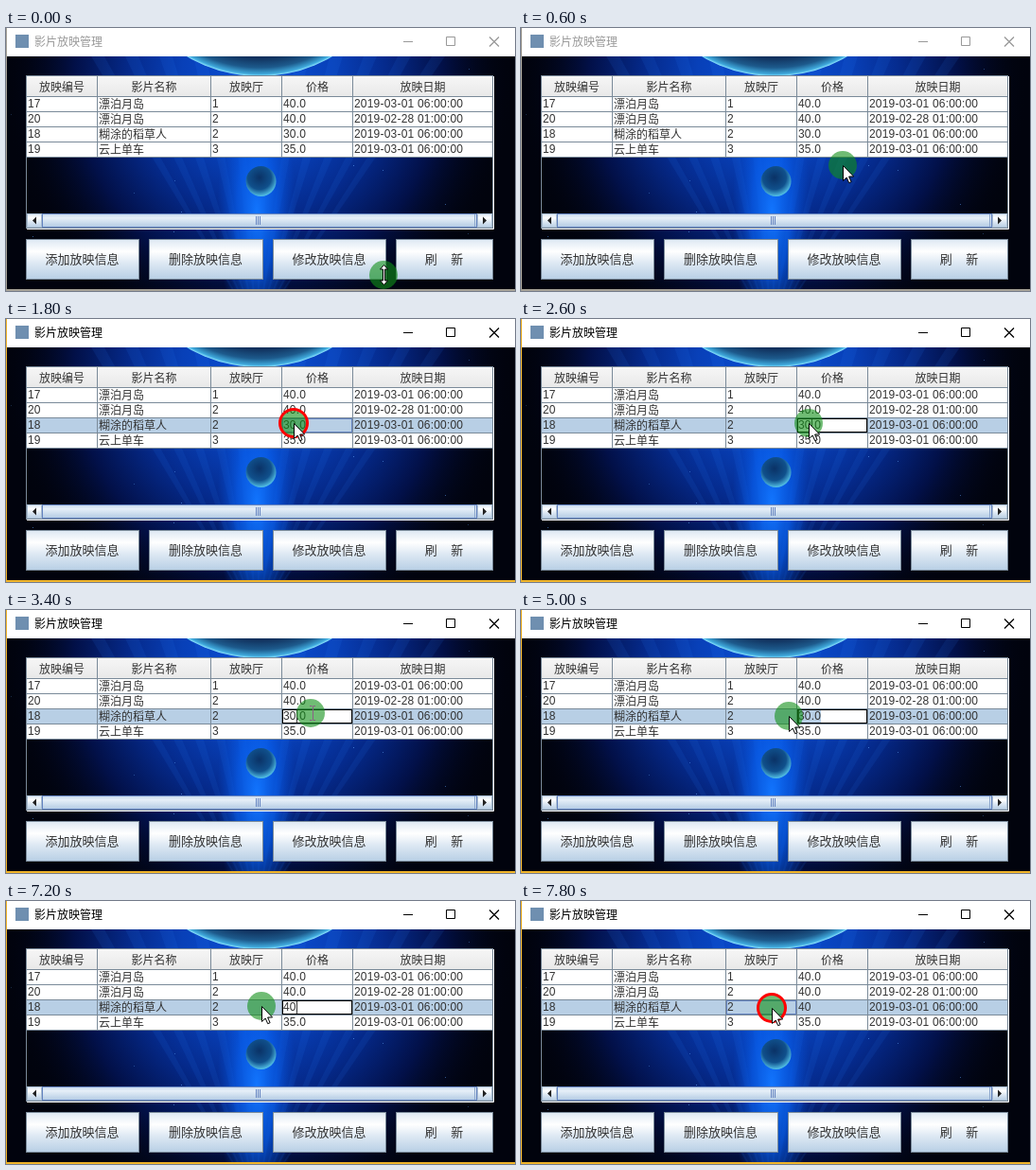
An HTML page that plays this animation: 538x278 px, repeating every 8000 ms.

```html
<!DOCTYPE html>
<html lang="zh-CN">
<head>
<meta charset="utf-8">
<style>
html, body { margin: 0; width: 538px; height: 278px; overflow: hidden; }
svg { display: block; }
text { font: 12px "Liberation Sans", "Noto Sans CJK SC", "Noto Sans CJK", sans-serif; fill: #333; white-space: pre; }
.num { letter-spacing: .2px; }
.btn { font-size: 13px; }
.mid { text-anchor: middle; }
</style>
</head>
<body>
<svg id="stage" width="538" height="278">
  <defs>
    <linearGradient id="metal" x2="0" y2="1">
      <stop stop-color="#dde8f3"/><stop offset=".3" stop-color="#fff"/>
      <stop offset=".6" stop-color="#dde8f3"/><stop offset="1" stop-color="#b8cfe5"/>
    </linearGradient>
    <linearGradient id="thumb" x2="0" y2="1">
      <stop stop-color="#c6d9ec"/><stop offset=".3" stop-color="#e6eff8"/><stop offset="1" stop-color="#b3cbe3"/>
    </linearGradient>
    <linearGradient id="head" x2="0" y2="1">
      <stop stop-color="#f6f6f6"/><stop offset="1" stop-color="#e8e8e8"/>
    </linearGradient>
    <radialGradient id="glow">
      <stop stop-color="#0a50d8"/><stop offset=".3" stop-color="#0840b8"/>
      <stop offset=".5" stop-color="#052a8c"/><stop offset=".72" stop-color="#021048"/>
      <stop offset="1" stop-color="#01030d" stop-opacity="0"/>
    </radialGradient>
    <radialGradient id="beam">
      <stop stop-color="#1276ff"/><stop offset=".5" stop-color="#0860f0" stop-opacity=".7"/>
      <stop offset="1" stop-color="#0550d8" stop-opacity="0"/>
    </radialGradient>
    <radialGradient id="world">
      <stop offset=".87" stop-color="#10305c"/><stop offset=".94" stop-color="#1d5a8c"/>
      <stop offset=".985" stop-color="#3fa9dc"/><stop offset="1" stop-color="#8fe6ff"/>
    </radialGradient>
    <radialGradient id="moon" cx=".45" cy=".38" r=".65">
      <stop stop-color="#0a3266"/><stop offset=".6" stop-color="#10508c"/><stop offset="1" stop-color="#5cd0f2"/>
    </radialGradient>
  </defs>
  <g id="scene"></g>
  <g id="live"></g>
</svg>
<script>
const $ = id => document.getElementById(id);
const rect = (x, y, w, h, fill, more = "") =>
  `<rect x="${x}" y="${y}" width="${w}" height="${h}" fill="${fill}" ${more}/>`;
const frame = (x, y, w, h, color, fill = "none") =>
  rect(x + .5, y + .5, w - 1, h - 1, fill, `stroke="${color}"`);
const text = (x, y, s, cls = "", more = "") =>
  `<text x="${x}" y="${y}" class="${cls}" ${more}>${s}</text>`;
const line = (d, color, more = "") => `<path d="${d}" fill="none" stroke="${color}" ${more}/>`;

const GRID = "#7a8a99", SELECTED = "#b8cfe5";
const cols = [22, 97, 217, 292, 367, 515];
const heads = ["放映编号", "影片名称", "放映厅", "价格", "放映日期"];
const rows = [
  ["17", "漂泊月岛", "1", "40.0", "2019-03-01 06:00:00"],
  ["20", "漂泊月岛", "2", "40.0", "2019-02-28 01:00:00"],
  ["18", "糊涂的稻草人", "2", "30.0", "2019-03-01 06:00:00"],
  ["19", "云上单车", "3", "35.0", "2019-03-01 06:00:00"]
];
const buttons = [[21, 120, "添加放映信息"], [151, 121, "删除放映信息"], [282, 120, "修改放映信息"], [412, 103, "刷    新"]];

function sky() {
  let seed = 7, stars = "", rays = "";
  const rnd = () => (seed = seed * 16807 % 2147483647) / 2147483647;
  for (let i = 0; i < 45; i++)
    stars += rect(rnd() * 538 | 0, 30 + rnd() * 247 | 0, 1, 1, "#5b9cf0", `opacity="${.2 + rnd() * .5}"`);
  for (let x = 90; x < 460; x += 36)
    rays += `<path d="M265 320L${x} 30h14z" fill="#2a80ff" opacity=".1"/>`;
  return rect(0, 30, 538, 248, "#01030d") +
    `<ellipse cx="267" cy="50" rx="270" ry="300" fill="url(#glow)"/>${rays}
    <ellipse cx="265" cy="195" rx="42" ry="135" fill="url(#beam)"/>` + stars +
    `<circle cx="268" cy="-101" r="152" fill="url(#world)"/>
    <circle cx="269.500" cy="162" r="16" fill="url(#moon)"/>`;
}

function rowArt(r, price, selected) {
  const y = 73 + r * 16;
  return rect(22, y, 492, 15, selected ? SELECTED : "#fff") +
    line(`M22 ${y + 15.5}H514` + cols.slice(1).map(x => `M${x - .5} ${y}v16`).join(""), GRID) +
    rows[r].map((s, i) => i == 1 ? text(cols[i] + 1, y + 12, s)
      : text(cols[i] + 1, y + 11, i == 3 ? price : s, "num")).join("");
}

function table() {
  return rect(22, 51, 492, 22, "url(#head)") +
    line("M22 72.5H514" + cols.slice(1).map(x => `M${x - .5} 51v22`).join(""), GRID) +
    heads.map((s, i) => text((cols[i] + cols[i + 1] - 1) / 2, 66.5, s, "mid")).join("") +
    rows.map((r, i) => rowArt(i, r[3])).join("") +
    rect(22, 196, 492, 15, "#eee") +
    frame(22, 196, 16, 15, "#a9bdd2", "url(#metal)") + frame(498, 196, 16, 15, "#a9bdd2", "url(#metal)") +
    frame(38, 196, 460, 15, "#6382bf", "url(#thumb)") + line("M495.5 197v13", "#8fa9cc") +
    line("M264.5 199v9m2-9v9m2-9v9", "#6382bf") +
    `<path d="M32 199.500v8l-4-4zM504 199.500v8l4-4z" fill="#222"/>` +
    frame(21, 50, 494, 162, GRID) + line("M515.5 51V212.5H22", "#fff");
}

$("scene").innerHTML = sky() + table() + buttons.map(([x, w, s]) =>
  frame(x, 223, w, 43, GRID, "url(#metal)") + text(x + w / 2 - .5, 249, s, "btn mid")).join("");

// Pointer stops: time, x, y
const path = [
  [0, 399, 261], [200, 394, 240], [600, 340, 145], [800, 305, 114], [1000, 308, 111], [1200, 317, 110],
  [1600, 304, 110], [2600, 304, 110], [2800, 298, 111], [3000, 299, 106], [3400, 322, 109],
  [3600, 322, 109], [4200, 283, 112], [6600, 283, 112], [7000, 275, 109], [7400, 265, 113], [8000, 265, 113]
];
const within = (t, ...spans) => spans.some(([a, b]) => t >= a && t < b);

function place(t) {
  const i = path.findIndex(p => p[0] > t);
  const [a, x, y] = path[i - 1], [b, u, v] = path[i], k = (t - a) / (b - a);
  return [Math.round(x + (u - x) * k), Math.round(y + (v - y) * k)];
}

function windowBar(active) {
  const ink = active ? "#000" : "#999", edge = active ? "#f0b429" : "#a5a196";
  return rect(0, 0, 538, 30, "#fff") + rect(10, 7, 14, 14, "#6f8fb0") +
    text(30, 19, "影片放映管理", "", `style="fill:${ink}"`) +
    line("M420 14.5h10M465.5 9.5h9v9h-9z", ink) +
    line("M511 9.5l10 10m0-10l-10 10", ink, `stroke-width="1.3"`) +
    rect(0, 0, 1, 278, edge) + rect(0, 276, 538, 2, edge);
}

// Dragging left from the end of the number selects it; typing replaces it.
function editor(t, value) {
  const selecting = within(t, [3800, 6000]);
  const caret = selecting ? Math.max(293, Math.min(317, place(t)[0])) : within(t, [6000, 6200]) ? 300 : 307;
  const shown = !within(t, [4600, 5000], [5600, 6000]);
  return frame(292, 105, 74, 15, "#000", "#fff") +
    (selecting ? rect(caret, 106, 317 - caret, 13, SELECTED) : "") + text(293, 116, value, "num") +
    (shown ? rect(caret, 106, 1, 13, "#333") : "");
}

function pointer(t) {
  const [x, y] = place(t);
  let art = `<circle cx="${x}" cy="${y}" r="15" fill="#109018" fill-opacity=".6"/>`;
  if (within(t, [1800, 2400], [2800, 3200], [7600, 8000]))
    art += `<circle cx="${x}" cy="${y}" r="14.5" fill="none" stroke="#f00" stroke-width="3"/>`;
  const shape = t < 200
    ? `<path d="M.5-10.5l4 4.500h-3v12h3l-4 4.500-4-4.500h3v-12h-3z" fill="#fff" stroke="#000"/>`
    : within(t, [3200, 5000])
      ? line("M-1-7.500h2.500m1 0h2.500M2.500-7V7M-1 7.500h2.500m1 0h2.500", "#8c5f86")
      : `<path d="M.5.500v16l3.700-3.500 2.500 5.700 2.400-1-2.500-5.700h5z" fill="#fff" stroke="#000"/>`;
  return art + `<g transform="translate(${x} ${y})">${shape}</g>`;
}

function draw(now) {
  const t = Math.floor(now % 8000 / 200) * 200;
  const active = t >= 1800, editing = within(t, [2200, 7600]);
  const value = t < 6000 ? "30.0" : t < 6200 ? "4" : "40";
  let art = windowBar(active);
  if (active) art += rowArt(2, editing ? "" : value, true);
  if (editing) art += editor(t, value);
  else if (active) art += frame(t < 2200 ? 292 : 217, 105, 74, 15, "#6382bf");
  $("live").innerHTML = art + pointer(t);
}

let last = -1;
function tick(now) {
  const step = Math.floor(now / 200);
  if (step != last) draw(now);
  last = step;
  requestAnimationFrame(tick);
}
draw(0);
requestAnimationFrame(tick);
</script>
</body>
</html>
```
